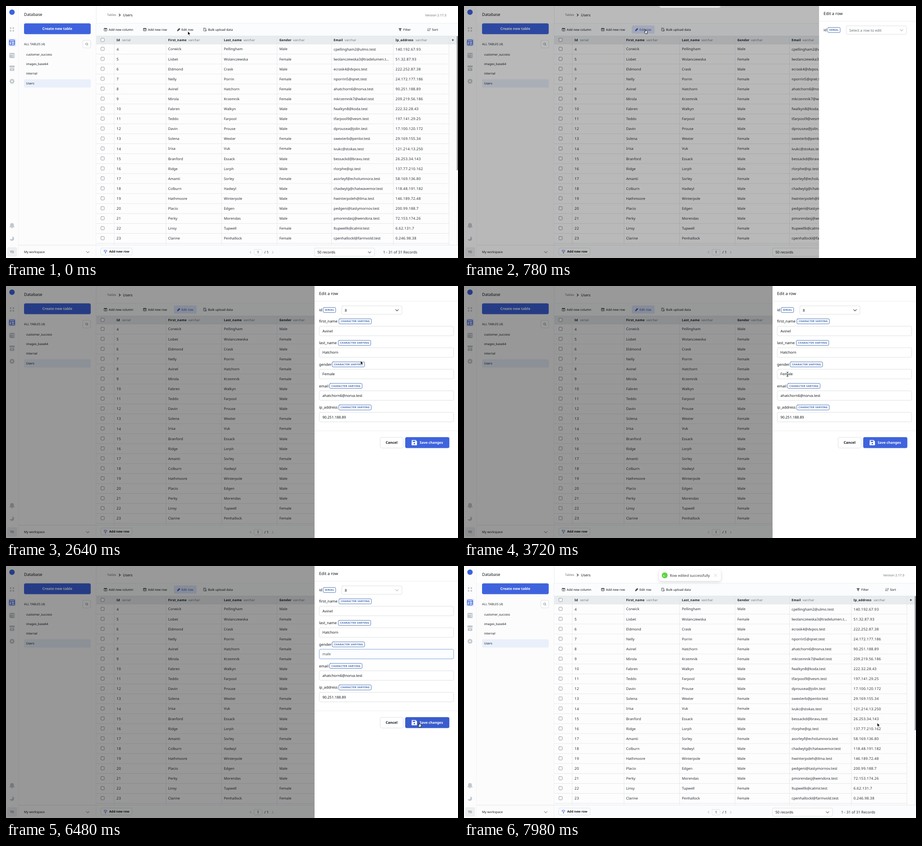
Animation, 1002 px wide and 559 px high, one loop 8 s. Source, as an HTML page with a canvas:

```html
<!DOCTYPE html>
<html lang="en">
<head>
<meta charset="utf-8">
<title>Edit a row</title>
<style>
html, body { margin: 0; width: 100%; height: 100%; overflow: hidden; background: #fff; }
canvas { display: block; width: 1002px; height: 559px; }
</style>
</head>
<body>
<canvas id="stage"></canvas>
<script>
const W = 1002, H = 559, LOOP = 8000;
const INK = '#11181c', BODY = '#2b3136', GREY = '#687076', LINE = '#dfe3e6', EDGE = '#d3d8dc',
  BLUE = '#3e63dd', TAG = '#3a66b0', ICON = '#c1c8cd';
const canvas = document.getElementById('stage');
const dpr = window.devicePixelRatio || 1;
canvas.width = W * dpr;
canvas.height = H * dpr;
const c = canvas.getContext('2d');
c.scale(dpr, dpr);
c.textRendering = 'geometricPrecision';

const people = [
  ['Corwick', 'Pellingham', 'M', 'ulmo.test', '140.192.67.93'],
  ['Lisbet', 'Wolanczewska', 'F', 'tradelumen.t...', '51.32.87.93'],
  ['Eldmond', 'Crask', 'M', 'dvpos.test', '222.252.87.38'],
  ['Nelly', 'Porrin', 'F', 'qnet.test', '24.172.177.186'],
  ['Avinel', 'Hatchorn', 'F', 'norva.test', '90.251.188.89'],
  ['Mirola', 'Krzemnik', 'F', 'wikel.test', '209.219.56.186'],
  ['Fabren', 'Walkyn', 'M', 'koda.test', '222.32.28.43'],
  ['Teddo', 'Farpool', 'M', 'vesm.test', '197.141.29.25'],
  ['Davin', 'Prouse', 'M', 'jolin.test', '17.100.120.172'],
  ['Solena', 'Wexter', 'F', 'penlor.test', '29.169.155.34'],
  ['Irisa', 'Vuk', 'F', 'stokas.test', '121.214.13.250'],
  ['Branford', 'Essack', 'M', 'bravu.test', '26.253.34.143'],
  ['Ridge', 'Lorph', 'M', 'qz.test', '137.77.210.162'],
  ['Amanti', 'Sorley', 'F', 'echolumnora.test', '58.169.136.80'],
  ['Colburn', 'Hadwyl', 'M', 'chatwavemor.test', '118.48.191.182'],
  ['Hathmoore', 'Winterpole', 'M', 'ilma.test', '146.189.72.48'],
  ['Placio', 'Edgen', 'M', 'tastymornov.test', '200.99.188.7'],
  ['Perky', 'Morendas', 'M', 'wendora.test', '72.153.174.26'],
  ['Linsy', 'Tupwell', 'F', 'calmir.test', '6.62.131.7'],
  ['Clarine', 'Penhallock', 'F', 'farmvold.test', '0.246.98.38']
].map(([first, last, g, host, ip], i) => ({
  id: i + 4, first, last, ip, gender: g === 'M' ? 'Male' : 'Female',
  email: (first[0] + last).toLowerCase() + (i + 2).toString(36) + '@' + host
}));
const picked = people[4];

// ---- helpers ----
const clamp = v => Math.min(1, Math.max(0, v));
const span = (t, a, b) => clamp((t - a) / (b - a));
const smooth = v => v * v * (3 - 2 * v);
const between = (t, a, b) => t >= a && t < b;

function bezier(x1, y1, x2, y2) {
  const at = (a, b, s) => 3 * a * s * (1 - s) ** 2 + 3 * b * s * s * (1 - s) + s ** 3;
  return x => {
    let lo = 0, hi = 1;
    for (let i = 0; i < 24; i++) {
      const mid = (lo + hi) / 2;
      if (at(x1, x2, mid) < x) lo = mid; else hi = mid;
    }
    return at(y1, y2, lo);
  };
}
const ease = bezier(.25, .1, .25, 1);
const pop = bezier(.21, 1.02, .73, 1);

function text(s, x, y, size = 8, color = INK, weight = 400, spacing = 0, align = 'left') {
  c.font = `${weight} ${size}px "Noto Sans", "Open Sans", sans-serif`;
  c.letterSpacing = spacing + 'px';
  c.textAlign = align;
  c.fillStyle = color;
  c.fillText(s, x, y + size * .355);
}
function fill(x, y, w, h, color) {
  c.fillStyle = color;
  c.fillRect(x, y, w, h);
}
function box(x, y, w, h, r, bg, edge, lw = .8) {
  c.beginPath();
  c.roundRect(x, y, w, h, r);
  if (bg) { c.fillStyle = bg; c.fill(); }
  if (edge) { c.strokeStyle = edge; c.lineWidth = lw; c.stroke(); }
}
function disc(x, y, r, color, edge, lw = 1) {
  c.beginPath();
  c.arc(x, y, r, 0, 7);
  if (color) { c.fillStyle = color; c.fill(); }
  if (edge) { c.strokeStyle = edge; c.lineWidth = lw; c.stroke(); }
}
function path(pts, color, lw = 1, bg) {
  c.beginPath();
  for (let i = 0; i < pts.length; i += 2) c.lineTo(pts[i], pts[i + 1]);
  if (bg) { c.closePath(); c.fillStyle = bg; c.fill(); }
  c.lineCap = c.lineJoin = 'round';
  c.strokeStyle = color;
  c.lineWidth = lw;
  c.stroke();
}
const chevron = (x, y, color, r = 3.2) => path([x - r, y - r / 2, x, y + r / 2, x + r, y - r / 2], color, 1.1);
const sideArrow = (x, y, d, color, lw) => path([x - d, y - 2.4, x + d, y, x - d, y + 2.4], color, lw);

// ---- page ----
function rail() {
  fill(0, 0, 28, H, '#fcfcfd');
  disc(13.3, 13.8, 6, BLUE);
  for (const dx of [-3, 3]) for (const dy of [-3, 3]) disc(13.2 + dx, 52 + dy, 1.9, ICON);
  box(4.5, 72, 18, 18, 3, '#e8eefd');
  box(7.6, 75.6, 11.4, 11, 1.6, null, BLUE, 1.5);
  path([7.6, 79, 19, 79], BLUE, 1.6);
  path([11.6, 79, 11.6, 86.5], BLUE, 1.4);
  path([11.6, 82.8, 19, 82.8], BLUE, 1.2);
  box(7.4, 104, 12, 11.4, 2.4, ICON);
  fill(7.4, 107, 12, .9, '#fff');
  fill(14.6, 110, 4.8, 2, '#e8ebed');
  box(7.6, 132, 11.6, 4.6, 1.6, ICON);
  box(8.4, 138, 10, 6, 1.2, ICON);
  disc(13.3, 141, 1.3, '#fff');
  for (let i = 0; i < 8; i++) {
    const a = i * Math.PI / 4;
    path([13.3, 167, 13.3 + 5 * Math.cos(a), 167 + 5 * Math.sin(a)], ICON, 2.2);
  }
  disc(13.3, 167, 4.6, ICON);
  disc(13.3, 167, 1.9, '#fcfcfd');
  box(9.2, 481.4, 8.2, 9, [4, 4, 1, 1], ICON);
  path([8, 490, 18.6, 490], ICON, 1.3);
  path([12, 492.3, 14.6, 492.3], ICON, 1.4);
  disc(13, 516, 5, ICON);
  disc(10.4, 513.6, 4, '#fcfcfd');
  box(2.5, 535, 22, 21, 3, '#eceef0');
  text('TD', 13.4, 545.6, 6.9, '#4c5155', 500, 0, 'center');
  fill(27.6, 0, .8, H, '#e9ecee');
}

function pageHead() {
  fill(28.4, 0, W - 28.4, 38, '#fff');
  fill(199.6, 0, .8, 38, LINE);
  text('Database', 40, 18.8, 9.15, INK, 500);
  text('Tables', 224, 20, 6.9, GREY);
  sideArrow(252, 20, 1.4, INK, 1.1);
  text('Users', 259.3, 20, 8, INK, 500);
  text('Version 2.17.3', 929.3, 20, 7.1, GREY);
}

function sidebar() {
  fill(28.4, 38, 171.4, H - 38, '#fcfcfd');
  box(40, 38.5, 147.8, 24, 3.5, BLUE);
  text('Create new table', 113.7, 50, 7.85, '#fff', 600, 0, 'center');
  text('ALL TABLES (4)', 40, 84.4, 6.85, '#2b3136', 500);
  box(170.3, 76, 17.4, 17, 3, '#fff', EDGE);
  disc(178.7, 84.2, 2.3, null, GREY, .8);
  path([180.5, 86, 181.8, 87.3], GREY, .8);
  box(40, 162.4, 148, 18.6, 3, '#e9f0fb');
  ['customer_success', 'images_base64', 'internal', 'Users'].forEach((s, i) =>
    text(s, 44.7, 107.2 + 21.4 * i, 6.75, INK));
  fill(28, 530, 172, .8, LINE);
  text('My workspace', 40, 546, 6.85, INK);
  chevron(181.3, 546, '#889096');
  fill(199.6, 38, .8, H - 38, LINE);
}

function gridIcon(x, y, vertical) {
  box(x, y, 6.4, 6, .8, null, '#4c5155', .9);
  fill(x, y, 6.4, 1.8, '#4c5155');
  if (vertical) fill(x + 2.8, y, .9, 6, '#4c5155');
  else fill(x, y + 3.4, 6.4, .9, '#4c5155');
}

function toolbar(hover) {
  const label = (s, x, color = INK) => text(s, x, 52.4, 6.9, color, 500);
  fill(200, 38, W - 200, 28.5, '#fbfcfd');
  fill(200, 37.8, W - 200, .7, '#e6e9eb');
  gridIcon(217.4, 49.4, true);
  label('Add new column', 227.8);
  gridIcon(304.5, 49.4, false);
  label('Add new row', 314.8);
  c.save();
  c.globalAlpha = hover;
  box(372, 43.3, 50.5, 18, 3, '#dfe8fd');
  c.restore();
  const lit = hover > .5;
  path([379.8, 55.6, 380.2, 53.2, 384, 49.3, 385.9, 51.2, 382, 55], lit ? '#3451b2' : INK, .5, lit ? BLUE : '#4c5155');
  label('Edit row', 389, lit ? '#3451b2' : INK);
  box(438, 49, 5, 6.4, .7, null, '#4c5155', .9);
  path([439.4, 51.4, 441.6, 51.4], '#4c5155', .7);
  path([441, 55.2, 444, 55.2, 444, 53], '#4c5155', .9);
  label('Bulk upload data', 448);
  path([870.6, 49.8, 876.8, 49.8, 874.4, 52.4, 874.4, 55.4, 872.9, 54.6, 872.9, 52.4], '#4c5155', .7, '#4c5155');
  label('Filter', 880.8);
  for (let i = 0; i < 3; i++) path([938, 50 + 2.4 * i, 941.6 - i, 50 + 2.4 * i], '#4c5155', .9);
  path([935.6, 49.4, 935.6, 55], '#4c5155', .9);
  path([934.2, 53.8, 935.6, 55.3, 937, 53.8], '#4c5155', .8);
  label('Sort', 944.4);
}

const check = y => box(210.4, y - 3.7, 7.4, 7.4, 1.3, '#fff', '#858c92', .9);

function table() {
  fill(200, 66.5, W - 200, 463.5, '#fdfdfe');
  fill(200, 66.5, W - 200, 18, '#e9ecee');
  fill(200, 66.2, W - 200, .8, LINE);
  check(75.2);
  const heads = [['Id', 245, 'serial', 257.6], ['First_name', 359.5, 'varchar', 404.2],
    ['Last_name', 483, 'varchar', 526.4], ['Gender', 606, 'varchar', 636.6],
    ['Email', 726.3, 'varchar', 750.8], ['Ip_address', 863.5, 'varchar', 908]];
  for (const [name, x, type, tx] of heads) {
    text(name, x, 75.6, 7, INK, 600, .25);
    text(type, tx, 75.6, 6.9, GREY, 400, .2);
  }
  path([988.6, 75.4, 992.4, 75.4], INK, 1);
  path([990.5, 73.5, 990.5, 77.3], INK, 1);
  people.forEach((p, i) => {
    const y = 95.7 + 22.1 * i;
    fill(200, y + 10.6, 782, .8, LINE);
    check(y - .6);
    text(p.id, 245, y, 8.1, BODY, 400, .25);
    text(p.first, 359.5, y, 7.85, BODY);
    text(p.last, 483, y, 7.85, BODY);
    text(p.gender, 606, y, 7.85, BODY);
    text(p.email, 726.3, y, 8, BODY);
    text(p.ip, 863.5, y, 8, BODY, 400, .3);
  });
  fill(200, 84.2, W - 200, .8, LINE);
  for (const x of [239.6, 354.5, 477.5, 600.5, 721.3, 858.4, 981.5]) fill(x, 66.5, .8, 463.5, LINE);
  fill(999, 66.5, 3, 463.5, '#f3f4f5');
  box(999.2, 66.5, 2.8, 298, 1.2, '#8f9296');
}

function footer() {
  fill(200, 530, W - 200, 29, '#fbfcfd');
  fill(200, 529.8, W - 200, .8, LINE);
  box(210, 537, 69.6, 15.2, 3, '#fff', EDGE);
  box(217.4, 541.8, 6.2, 2.8, .6, null, BLUE, .9);
  path([220.5, 546, 220.5, 548.6], BLUE, .9);
  path([219.2, 547.3, 221.8, 547.3], BLUE, .9);
  text('Add new row', 228.7, 545, 6.95, INK, 600);
  sideArrow(542, 546.4, -1.2, '#889096', .8);
  box(550, 540.2, 17.4, 12, 2, '#fff', EDGE);
  text('1', 558.8, 546.2, 8, INK, 400, 0, 'center');
  text('/ 1', 572.8, 546.2, 8, INK);
  sideArrow(591.4, 546.4, 1.2, '#889096', .8);
  box(684, 537, 133, 18, 3, '#fff', EDGE);
  text('50 records', 690.2, 546.2, 8.05, INK);
  chevron(806, 546.4, GREY);
  text('1 - 31 of 31 Records', 836, 546, 8.25, BODY);
}

// ---- drawer ----
function badge(x, y, w, label) {
  box(x, y - 5.6, w, 11.2, 2.2, '#fff', TAG, .9);
  text(label, x + w / 2 + .15, y, 5.6, TAG, 700, .3, 'center');
}

function field(label, badgeX, value, i, t) {
  const y = 99.8 + 47.75 * i, isGender = i === 2;
  const focus = isGender ? span(t, 3870, 4000) * (1 - span(t, 6990, 7110)) : 0;
  text(label, 694, y - 21.4, 8.2, INK, 500);
  badge(badgeX, y - 21.4, 72, 'CHARACTER VARYING');
  box(694.4, y - 10.6, 298, 21.2, 3, '#fff', EDGE);
  if (focus) {
    c.save();
    c.globalAlpha = focus;
    box(694.4, y - 10.6, 298, 21.2, 3, '#fbfdff', '#7fa6dc', 1);
    c.restore();
  }
  if (isGender && between(t, 4020, 4740)) fill(701.4, y - 6.4, 28.6, 13, '#b3d7ff');
  text(value, 701.5, y, 8, isGender && between(t, 4740, 7020) ? '#4c5155' : INK);
  if (isGender && between(t, 4740, 7020) && !between(t, 5520, 6000) && !between(t, 6480, 6960))
    fill(702 + c.measureText(value).width, y - 5.8, .8, 11.6, INK);
}

function gender(t) {
  if (t < 4740) return picked.gender;
  return 'male'.slice(0, 1 + (t >= 4830) + (t >= 5010) + (t >= 5130));
}

function form(t) {
  field('first_name', 738, picked.first, 0, t);
  field('last_name', 736.6, picked.last, 1, t);
  field('gender', 723, gender(t), 2, t);
  field('email', 717.4, picked.email, 3, t);
  field('ip_address', 737.7, picked.ip, 4, t);
  fill(684, 320.8, 318, .8, '#e6e9eb');
  box(829.4, 335.6, 51, 23.8, 3.5, '#fff', EDGE);
  text('Cancel', 854.8, 347.6, 7.85, INK, 600, 0, 'center');
  const blue = t >= 5880 ? '#3a5ccc' : BLUE;
  box(885, 335.2, 97.8, 24.4, 3.5, blue);
  path([899.8, 342.2, 908, 342.2, 910.6, 344.8, 910.6, 352.8, 899.8, 352.8], '#fff', 1, '#fff');
  fill(901.6, 343.4, 5.6, 2.6, blue);
  disc(905.2, 349.6, 1.7, blue);
  text('Save changes', 917, 347.6, 7.7, '#fff', 600);
}

function menu(t, cy) {
  const p = ease(span(t, 1800, 1920));
  if (!p || t >= 2640) return;
  c.save();
  c.globalAlpha = p;
  c.shadowColor = 'rgba(0,0,0,.14)';
  c.shadowBlur = 6;
  box(744.4, 66, 133.4, 148, 3, '#fff');
  c.shadowColor = 'transparent';
  box(744.4, 66, 133.4, 148, 3, '#fff', EDGE, .7);
  c.clip();
  const over = Math.max(0, Math.floor((cy - 68) / 22));
  for (let i = 0; i < 7; i++) {
    if (i === over) fill(744.8, 68 + 22 * i, 132.6, 22, '#e9effc');
    text(people[i].id, 751, 79 + 22 * i, 8.1, INK);
  }
  c.restore();
}

function drawer(t, p, cy) {
  c.save();
  c.translate(318 * (1 - p), 0);
  fill(684, 0, 318, H, '#fff');
  text('Edit a row', 694, 17, 9.15, INK, 500);
  fill(684, 33.6, 318, .8, '#e6e9eb');
  text('id', 694, 53.4, 8.2, INK);
  badge(703.2, 53.2, 27.6, 'SERIAL');
  box(744.4, 44, 133.4, 18.8, 3, '#fff', EDGE);
  const chosen = t >= 2640;
  text(chosen ? '8' : 'Select a row to edit', 751, 53.8, 8.05, chosen ? INK : GREY);
  chevron(866.8, 53.8, between(t, 1800, 3900) ? '#3a3f43' : '#b4babf');
  if (chosen) form(t);
  menu(t, cy);
  c.restore();
}

// ---- toast ----
function toast(t) {
  if (between(t, 690, 870)) {
    const drop = 4 * Math.sin(Math.PI * span(t, 690, 870));
    box(433, drop - 25, 136, 25, 5, '#e2e2e2');
  }
  if (t < 7721) return;
  const p = pop(span(t, 7721, 8071)), s = .6 + .4 * p;
  c.save();
  c.globalAlpha = .5 + .5 * p;
  c.translate(501, 21.5 - 50 * (1 - p));
  c.scale(s, s);
  c.translate(-501, -21.5);
  c.shadowColor = 'rgba(0,0,0,.16)';
  c.shadowBlur = 7;
  c.shadowOffsetY = 2;
  box(432, 9, 138, 25, 5, '#fff');
  c.shadowColor = 'transparent';
  disc(444.6, 21.5, 6.6 * ease(span(t, 7770, 7960)), '#61d345');
  if (t > 7930) path([442.4, 21, 442.4, 23.6, 444, 23.6], '#fff', 1.1);
  text('Row edited successfully', 456, 21.6, 8.1, '#363636');
  path([554.8, 18.4, 561, 24.6], '#c4c8cb', .8);
  path([561, 18.4, 554.8, 24.6], '#c4c8cb', .8);
  c.restore();
}

// ---- pointer ----
// start, end, from, bend, to
const moves = [
  [180, 420, 403, 56, 403, 53, 402, 52],
  [1200, 1680, 402, 52, 600, 17, 832, 49],
  [2160, 2550, 832, 49, 800, 110, 786, 166],
  [3240, 3720, 786, 166, 735, 178, 717, 195.8],
  [5490, 6120, 722, 196, 930, 408, 916, 348]
];

function pointerAt(t) {
  const m = moves.filter(v => v[0] <= t).pop() || moves[0];
  const s = smooth(span(t, m[0], m[1])), r = 1 - s;
  const mix = i => r * r * m[i] + 2 * r * s * m[i + 2] + s * s * m[i + 4];
  return [mix(2), mix(3)];
}

function pointerShape(t, x, y) {
  if (t < 240 || t >= 7860) return 'arrow';
  if (t < 1230) return 'hand';
  if (t < 2640) return x > 744 && y > 44 ? 'hand' : 'arrow';
  if (between(t, 4740, 5490)) return 'none';
  if (x > 885 && y > 335 && y < 360) return 'hand';
  for (let i = 0; i < 5; i++) if (Math.abs(y - 99.8 - 47.75 * i) < 10.6) return 'beam';
  return 'arrow';
}

function pointer(t, x, y) {
  const shape = pointerShape(t, x, y);
  c.save();
  c.translate(x, y);
  if (shape === 'arrow') {
    path([0, 0, 0, 8.4, 1.9, 6.8, 3.2, 9.8, 4.6, 9.2, 3.3, 6.3, 5.9, 6.1], '#fff', .9, '#000');
  } else if (shape === 'hand') {
    path([-.9, .4, 0, -.3, .8, .4, .9, 3, 2.2, 3, 3.4, 3.5, 4.7, 4.2, 4.9, 6, 4, 9.6, -.1, 9.6,
      -2.4, 6.3, -2.3, 5.3, -1.4, 5.4, -.8, 6], '#111', .9, '#fff');
    for (const dx of [1, 2.4, 3.7]) path([dx, 6.3, dx, 8.2], '#333', .4);
  } else if (shape === 'beam') {
    const bar = (color, lw) => {
      path([-2, -5, 0, -4.2, 2, -5], color, lw);
      path([0, -4.2, 0, 4.2], color, lw);
      path([-2, 5, 0, 4.2, 2, 5], color, lw);
      path([-1, 1.4, 1, 1.4], color, lw);
    };
    bar('#fff', 1.8);
    bar('#111', .9);
  }
  c.restore();
}

function draw(t) {
  const open = ease(span(t, 664, 960)) - ease(span(t, 7729, 7978));
  const hover = t < 7730 ? span(t, 180, 330) : 0;
  const [x, y] = pointerAt(t);
  fill(0, 0, W, H, '#fff');
  rail();
  sidebar();
  pageHead();
  toolbar(hover);
  table();
  footer();
  if (open > 0) {
    fill(0, 0, W, H, `rgba(0,0,0,${.4 * open})`);
    // the header rises above the backdrop while the drawer closes
    if (t >= 7735) pageHead();
    drawer(t, open, y);
  }
  toast(t);
  pointer(t, x, y);
}

const start = performance.now();
function tick() {
  draw((performance.now() - start) % LOOP);
  requestAnimationFrame(tick);
}
tick();
</script>
</body>
</html>
```
